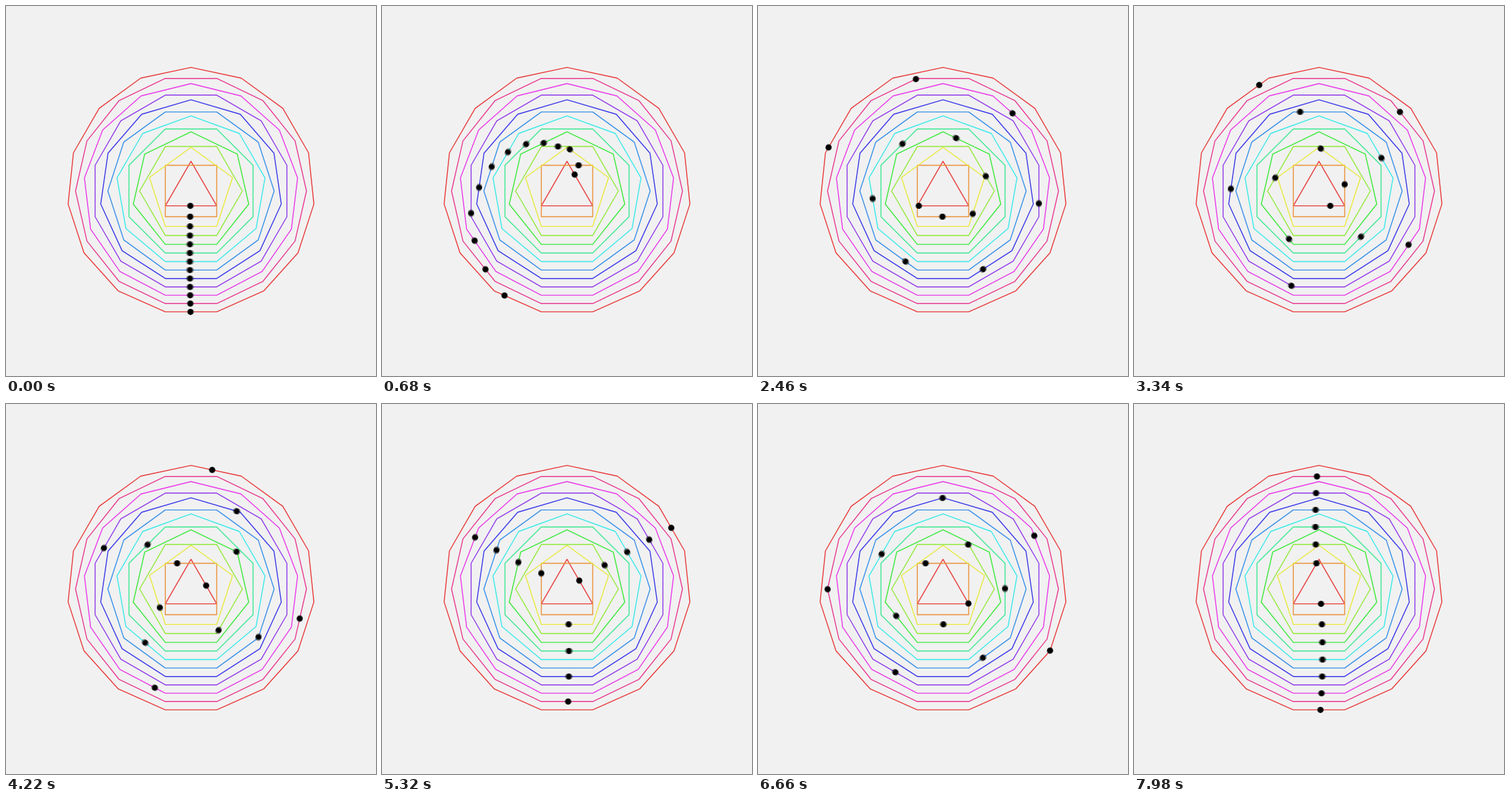
An HTML page with a canvas that plays this animation: 540 px wide and 540 px high, repeating every 8 s.

```html
<!DOCTYPE html>
<html lang="en">
<head>
<meta charset="utf-8">
<title>Polygon laps</title>
<style>
  html, body { margin: 0; width: 100%; height: 100%; overflow: hidden; background: #f1f1f1; }
  canvas { position: absolute; left: 0; top: 0; }
</style>
</head>
<body>
<canvas id="lines" width="540" height="540"></canvas>
<canvas id="dots" width="540" height="540"></canvas>
<script>
const lines = document.getElementById('lines').getContext('2d');
const dots = document.getElementById('dots').getContext('2d');
const CENTER = 270, SIDE = 75, MIN_SIDES = 3, MAX_SIDES = 15;
const LOOP = 8000, CYCLE = 16000, FRAME = 20;
const BLUR_SAMPLES = 5, SHUTTER = 0.6;

// Vertex 0 is the lower right corner; numbering runs clockwise.
function vertex(n, i) {
  const radius = SIDE / (2 * Math.sin(Math.PI / n));
  const angle = Math.PI / 2 + (2 * i - 1) * Math.PI / n;
  return [CENTER + radius * Math.cos(angle), CENTER + radius * Math.sin(angle)];
}

function drawPolygon(n) {
  lines.beginPath();
  for (let i = 0; i < n; i++) lines.lineTo(...vertex(n, i));
  lines.closePath();
  lines.strokeStyle = `hsl(${(n - MIN_SIDES) * 30}, 80%, 57%)`;
  lines.stroke();
}

// Laps start in the middle of the bottom side.
function drawDot(n, time) {
  const laps = (17 - n) * time / CYCLE;
  const along = (laps % 1) * n + 0.5;
  const side = Math.floor(along), part = along - side;
  const [x0, y0] = vertex(n, side), [x1, y1] = vertex(n, side + 1);
  dots.beginPath();
  dots.arc(x0 + (x1 - x0) * part, y0 + (y1 - y0) * part, 4.5, 0, 2 * Math.PI);
  dots.fill();
}

function draw(now) {
  const start = Math.floor((now % LOOP) / FRAME) * FRAME;
  dots.clearRect(0, 0, 540, 540);
  for (let s = 0; s < BLUR_SAMPLES; s++) {
    const time = start + s * FRAME * SHUTTER / BLUR_SAMPLES;
    for (let n = MIN_SIDES; n <= MAX_SIDES; n++) drawDot(n, time);
  }
  requestAnimationFrame(tick);
}

let origin;
function tick(now) {
  origin ??= now;
  draw(now - origin);
}

lines.lineWidth = 1.4;
lines.lineJoin = 'round';
for (let n = MIN_SIDES; n <= MAX_SIDES; n++) drawPolygon(n);

// Additive alpha averages the motion blur samples.
dots.globalCompositeOperation = 'lighter';
dots.fillStyle = `rgba(0, 0, 0, ${1 / BLUR_SAMPLES})`;
draw(0);
</script>
</body>
</html>
```
